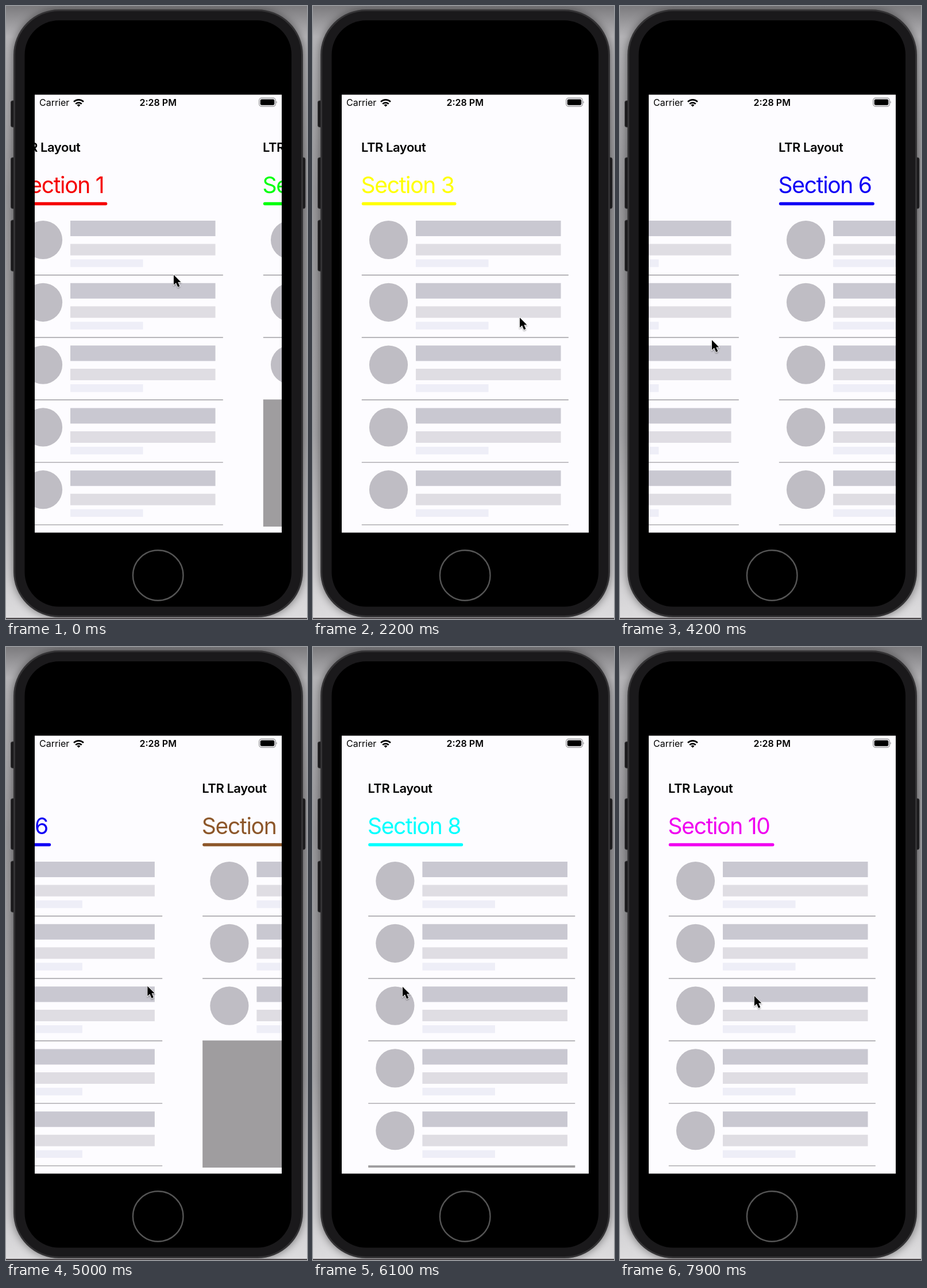
An HTML page that plays this animation: 524 by 1068 pixels, repeating every 8 s.

```html
<!DOCTYPE html>
<html lang="en">
<head>
<meta charset="utf-8">
<title>Paged sections</title>
<style>
  html, body { margin: 0; width: 100%; height: 100%; overflow: hidden; background: #8d8c8f; }
  svg { display: block; width: 524px; height: 1068px; font-family: Inter, sans-serif; }
  .status { font-size: 16px; }
  .time { font-weight: 600; text-anchor: middle; }
  .head { font-size: 22px; font-weight: 600; letter-spacing: -.45px; }
  .title { font-size: 39px; letter-spacing: -1.3px; }
</style>
</head>
<body>
<svg viewBox="0 0 524 1068">
  <defs>
    <linearGradient id="wall" x2="0" y2="1">
      <stop offset="0" stop-color="#7c7b7e"/>
      <stop offset=".05" stop-color="#b4b3b6"/>
      <stop offset=".3" stop-color="#98979a"/>
      <stop offset=".7" stop-color="#a5a4a7"/>
      <stop offset="1" stop-color="#dddcde"/>
    </linearGradient>
    <filter id="blur" x="-10%" y="-10%" width="120%" height="120%"><feGaussianBlur stdDeviation="8"/></filter>
    <filter id="soft" x="-50%" y="-50%" width="200%" height="200%">
      <feDropShadow dx="0" dy="1.5" stdDeviation="1.2" flood-opacity=".4"/>
    </filter>
    <clipPath id="screen"><rect x="50" y="154.5" width="430" height="763"/></clipPath>
    <g id="row">
      <circle cx="131.5" cy="407.5" r="33.6" fill="#bfbdc4"/>
      <path d="M179 374h252.5v27H179z" fill="#c9c8d1"/>
      <path d="M179 414.5h252.5v20H179z" fill="#dfdde3"/>
      <path d="M179 441.5h126.5v13.3H179z" fill="#eeeef7"/>
    </g>
  </defs>

  <rect width="524" height="1068" fill="url(#wall)"/>
  <rect x="14" y="8" width="502" height="1056" rx="78" opacity=".55" filter="url(#blur)"/>
  <path d="M0 1067h524" stroke="#4a4548" stroke-width="2"/>

  <g fill="#1b1a1c" stroke="#39383a">
    <rect x="8.5" y="165" width="10" height="46" rx="3"/>
    <rect x="8.5" y="264" width="10" height="89" rx="3"/>
    <rect x="8.5" y="373" width="10" height="89" rx="3"/>
    <rect x="511" y="264" width="10" height="89" rx="3"/>
  </g>
  <rect x="14.5" y="7.5" width="501" height="1056" rx="78" fill="#1a191b" stroke="#343335" stroke-width="3"/>
  <rect x="32.5" y="25" width="464.5" height="1021.5" rx="60"/>
  <circle cx="264.7" cy="992" r="43.8" fill="none" stroke="#555" stroke-width="2.4"/>

  <g clip-path="url(#screen)">
    <rect x="50" y="154" width="430" height="764" fill="#fdfcff"/>
    <g id="strip"></g>
  </g>

  <text class="status" x="58" y="174">Carrier</text>
  <text class="status time" x="264.7" y="174">2:28 PM</text>
  <g fill="none" stroke="#000" stroke-width="2.7">
    <path d="M118 166.9a12.2 12.2 0 0 1 17 0"/>
    <path d="M121.2 170.6a7.6 7.6 0 0 1 10.6 0"/>
    <path d="M126.5 175.6l-3-3a4.3 4.3 0 0 1 6 0z" fill="#000" stroke="none"/>
  </g>
  <rect x="440.7" y="160.4" width="28.6" height="14.4" rx="4" fill="none" stroke="#8b8a8d" stroke-width="1.2"/>
  <rect x="442.7" y="162.4" width="24.6" height="10.4" rx="2.4"/>
  <path d="M470.6 165.4q2 2.2 0 4.4z" fill="#77767a"/>

  <path id="cursor" d="M0 0V17.2L4 13.6L7.2 21L10.4 19.6L7.3 12.4H12.4Z" stroke="#fff" stroke-width="1.5"
        paint-order="stroke" filter="url(#soft)"/>
</svg>

<script>
const PAGE = 430, ROW = 108.8, LOOP = 8000, STEP = 100, SWIPE = 600, REST = 110;

// colour, underline width, full rows shown
const sections = [
  ['#f50000', 158.5, 5], ['#00ff0c', 163.5, 3], ['#ffff00', 164.7, 5], ['#f57c00', 165, 5],
  ['#747377', 164, 5], ['#1000f5', 166, 5], ['#8d572a', 161.5, 3], ['#00ffff', 165, 5],
  ['#800080', 165.5, 5], ['#f000f0', 183.7, 5]
];

// start time, press x/y, release x/y, time the pointer heads back
const swipes = [
  [-110, 359, 463, 155, 480, 850],
  [1490, 328, 517, 150, 530, 1860],
  [2310, 360, 543, 165, 550, 2620],
  [3095, 357, 557, 155, 565, 3450],
  [3950, 370, 575, 160, 582, 4280],
  [4802, 419, 588, 180, 592, 5150],
  [5619, 370, 588, 156, 592, 6130],
  [6510, 365, 594, 160, 600, 6830],
  [7310, 370, 602, 160, 600, 7700],
  [8310, 370, 623, 160, 630, 8700]
];

const strip = document.getElementById('strip');
const cursor = document.getElementById('cursor');

function drawSection([color, width, rows], i) {
  const end = 686 + (rows - 3) * ROW;
  let out = `<text class="head" x="84" y="254">LTR Layout</text>
    <text class="title" x="83.5" y="325.5" fill="${color}">Section ${i + 1}</text>
    <rect x="84.8" y="341.8" width="${width}" height="5.4" rx="2.7" fill="${color}"/>`;
  for (let r = 0; r < rows; r++) {
    const y = r * ROW;
    out += `<use href="#row" y="${y}"/>
      <path d="M84.8 ${468.7 + y}h360" stroke="#9f9ea2" stroke-width="1.4"/>`;
  }
  if (rows < 5 || i === 7)
    out += `<rect x="84.8" y="${end}" width="360" height="${907 - end}" fill="#9f9d9f"/>`;
  return `<g transform="translate(${i * PAGE})">${out}</g>`;
}

const clamp = v => Math.min(1, Math.max(0, v));
const glide = p => 1 - (1 - p) ** 3 * (1 + 3 * p);
const smooth = p => p * p * (3 - 2 * p);
const mix = (a, b, k) => a + (b - a) * k;

function pointerAt(t) {
  const i = swipes.findLastIndex(s => s[0] <= t);
  const [start, x0, y0, x1, y1, leave] = swipes[i];
  const [next, nx, ny] = swipes[i + 1];
  const drag = clamp(PAGE * glide(clamp((t - start) / SWIPE)) / (x0 - x1));
  const back = smooth(clamp((t - leave) / (next - REST - leave)));
  return t < leave
    ? [mix(x0, x1, drag), mix(y0, y1, drag)]
    : [mix(x1, nx, back), mix(y1, ny, back)];
}

function render(t) {
  const scroll = swipes.reduce((sum, s) => sum + PAGE * glide(clamp((t - s[0]) / SWIPE)), 0);
  strip.setAttribute('transform', `translate(${-scroll})`);
  cursor.setAttribute('transform', `translate(${pointerAt(t)})`);
}

strip.innerHTML = sections.map(drawSection).join('');
const begin = performance.now();
function tick() {
  const t = (performance.now() - begin) % LOOP;
  render(Math.floor(t / STEP) * STEP);
  requestAnimationFrame(tick);
}
tick();
</script>
</body>
</html>
```
